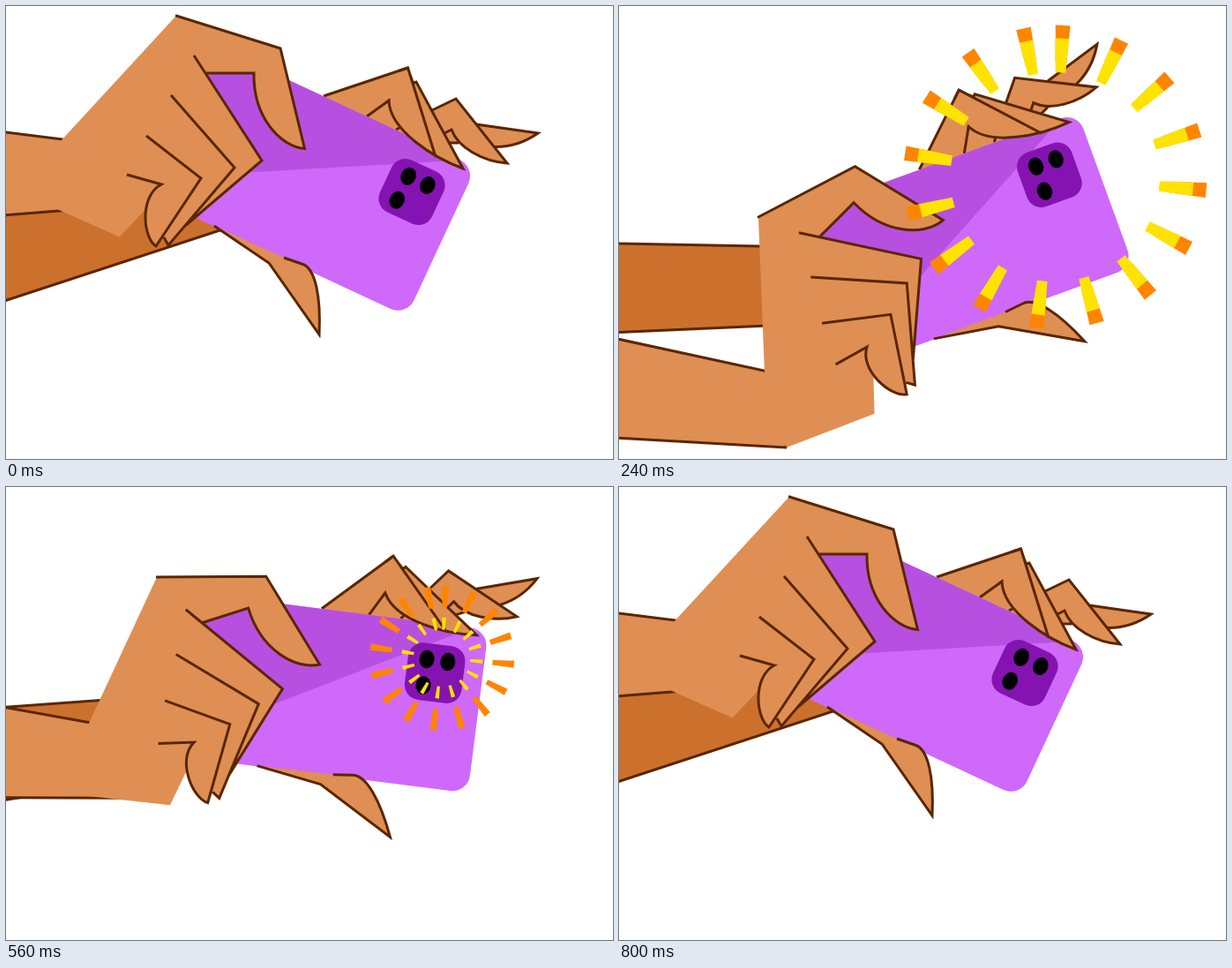
Recreate the animation shown at these times as an HTML page with a canvas. Size 688 by 513 pixels, loop 960 ms.

```html
<!DOCTYPE html>
<html lang="en">
<head>
<meta charset="utf-8">
<title>Phone flash</title>
<style>
html, body { margin: 0; width: 100%; height: 100%; overflow: hidden; background: #fff; }
canvas { display: block; }
</style>
</head>
<body>
<canvas id="stage" width="688" height="513"></canvas>
<script>
const ctx = document.getElementById('stage').getContext('2d');
const STEP = 40, LOOP = 960, RAD = Math.PI / 180;
const SKIN = '#df8f53', SHADE = '#cc712d', INK = '#5a2600';
const ORANGE = '#ff8400', YELLOW = '#ffe300';
const PIVOT = { x: 450.7, y: 167.3 };
const FLASH = { x: 494.2, y: 193.7 };

// Each pose: hand angle, shift x, shift y, forearm travel, orange radius, yellow radius
const raise = [
  [0, 0, 0, 0, 0, 0],
  [-5, 6, 1, 0.15, 10, 0],
  [-19.6, 17.5, 2.5, 0.523, 42, 12],
  [-36, 14, 2, 0.85, 77, 42],
  [-46, 5, 0, 1.03, 113, 78],
  [-48.5, 0, 1, 1.07, 146, 119],
  [-45, 0, 0, 1, 172, 157],
  [-44.4, 0.5, 0, 0.985, 0, 183],
  [-44.2, 1, 0, 0.983, 0, 0]
];
const lower = [
  [-44.2, 1, 0, 0.983, 11.5, 0],
  [-36, 6, 2, 0.84, 46, 12],
  [-17.75, 13.4, 5, 0.455, 82, 46],
  [-3, 8, -2, 0.1, 128, 88],
  [2, 2, -7, -0.05, 177, 140],
  [0.8, 0.8, -5.4, -0.018, 0, 179],
  [0.3, 0.3, -2, 0, 0, 194],
  [0.1, 0, -0.5, 0, 0, 0],
  [0, 0, 0, 0, 0, 0]
];

const shape = (fill, line = fill) => ({ fill: new Path2D(fill), line: new Path2D(line) });

const farFinger = shape(
  'M495 130 L533 134 L603 144 Q580 160 554 159.5 L512 156 L500 155 Z',
  'M533 134 L603 144 Q580 160 554 159.5 M500 155 L513 155');
const midFinger = shape(
  'M483 118 L510 105 L568 178 C540 176 512 160 505 140 L498 144 L480 150 Z',
  'M483 118 L510 105 L568 178 C540 176 512 160 505 140 L497 144');
const knuckles = shape(
  'M355 105 L360 102 L455.5 70 L480 160 L420 160 Z',
  'M360 102 L455.5 70 M434 107 L409 125 M442 140 L446 138');
const nearFinger = shape(
  'M434 107 L455.5 70 L463 85 L518 184 C485 172 435 141 434 107 Z',
  'M445 73.5 L455.5 70 L487 171 M462 87 L465 86 L518 184 C485 172 435 141 434 107 L430 109.9');
const thumb = shape(
  'M236 249 L298 291 L355 372 C357 330 351 296 335 292 L315 285 Z',
  'M236 249 L298 291 L355 372 C357 330 351 296 335 292 L315 285');
const hand = shape(
  'M193 11 L311 48 L338.5 161.5 C310 159 280 125 281 76 L227 76 L290 175 L203 249 L184 271 ' +
  'L179 262 L170 272 C155 262 151 215 176 202 L186 201 L128.5 261.5 L31 218 L61 154 Z',
  'M192 10.7 L311 48 L338.5 161.5 C310 159 280 125 281 76 L227 76 ' +
  'M213 56 L290 175 L203 249 M187 101 L259 183 L184 271 L179 262 ' +
  'M159 147 L221 195 L170 272 C155 262 151 215 176 202 L137 191');

function paint({ fill, line }, color) {
  ctx.fillStyle = color;
  ctx.fill(fill);
  ctx.stroke(line);
}

function polygon(points, color, outlined) {
  ctx.beginPath();
  points.forEach(p => ctx.lineTo(p[0], p[1]));
  ctx.closePath();
  ctx.fillStyle = color;
  ctx.fill();
  if (outlined) ctx.stroke();
}

function roundRect(x, y, w, h, r) {
  ctx.beginPath();
  ctx.roundRect(x, y, w, h, r);
}

// Runs a drawing in the space of the moving hand
function inHand([angle, dx, dy], draw) {
  ctx.save();
  ctx.translate(PIVOT.x + dx, PIVOT.y + dy);
  ctx.rotate(angle * RAD);
  ctx.translate(-PIVOT.x, -PIVOT.y);
  draw();
  ctx.restore();
}

function handPoint([angle, dx, dy], x, y) {
  const c = Math.cos(angle * RAD), s = Math.sin(angle * RAD);
  const u = x - PIVOT.x, v = y - PIVOT.y;
  return [PIVOT.x + dx + u * c - v * s, PIVOT.y + dy + u * s + v * c];
}

function drawPhone() {
  ctx.save();
  ctx.translate(454, 351.4);
  ctx.rotate(25 * RAD);
  roundRect(-335, -186, 335, 186, 20);
  ctx.restore();
  ctx.fillStyle = '#cf69fa';
  ctx.fill();
  ctx.save();
  ctx.clip();
  polygon([[514.6, 174.7], [283, 188], [140, 196], [200, 0], [520, 160]], '#b750e0');
  ctx.restore();

  ctx.save();
  ctx.translate(460, 210.5);
  ctx.rotate(25 * RAD);
  roundRect(-32.5, -32.5, 65, 65, 17);
  ctx.fillStyle = '#8413b1';
  ctx.fill();
  ctx.fillStyle = '#000';
  for (const [x, y] of [[-11, -14.3], [13, -14.3], [-11.3, 15.5]]) {
    ctx.beginPath();
    ctx.ellipse(x, y, 8.5, 10.3, 0, 0, 2 * Math.PI);
    ctx.fill();
  }
  ctx.restore();
}

function drawRays(outer, color) {
  if (!outer) return;
  const inner = outer * (outer < 100 ? 0.7 : 0.755), spread = 0.049;
  for (let i = 0; i < 16; i++) {
    ctx.save();
    ctx.translate(FLASH.x, FLASH.y);
    ctx.rotate((23 * i - 87) * RAD);
    polygon([[inner, -inner * spread], [outer, -outer * spread],
             [outer, outer * spread], [inner, inner * spread]], color);
    ctx.restore();
  }
}

function drawScene(pose) {
  const [, , , travel, orange, yellow] = pose;
  ctx.fillStyle = '#fff';
  ctx.fillRect(0, 0, 688, 513);
  ctx.strokeStyle = INK;
  ctx.lineWidth = 3;

  polygon([[-218, 265], handPoint(pose, 307, 177), handPoint(pose, 267, 246), [-127, 375]], SHADE, true);
  inHand(pose, () => {
    paint(farFinger, SKIN);
    paint(midFinger, SKIN);
    paint(knuckles, SKIN);
    drawPhone();
    paint(nearFinger, SKIN);
    paint(thumb, SKIN);
  });
  polygon([
    [-4, 142.5 + 234 * travel],
    [120 + 100 * travel, 158 + 267 * travel],
    [97 + 92 * travel, 229 + 271 * travel],
    [-4, 237 + 252 * travel]
  ], SKIN, true);
  inHand(pose, () => paint(hand, SKIN));

  drawRays(orange, ORANGE);
  drawRays(yellow, YELLOW);
}

function frame() {
  const step = Math.floor(performance.now() % LOOP / STEP);
  const half = LOOP / STEP / 2;
  const poses = step < half ? raise : lower;
  drawScene(poses[Math.min(step % half, poses.length - 1)]);
  requestAnimationFrame(frame);
}
frame();
</script>
</body>
</html>
```
